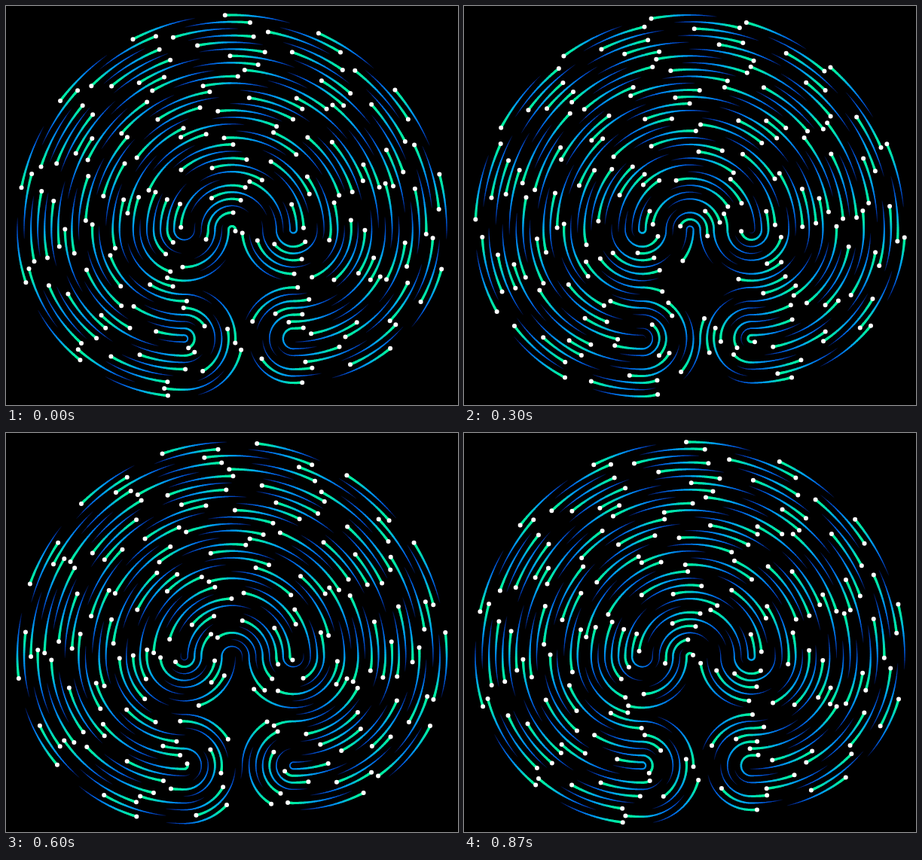
Animation of 600 by 530 pixels, one loop 900 ms. Source, as an HTML page with a canvas:

```html
<!DOCTYPE html>
<html lang="en">
<head>
<meta charset="utf-8">
<title>Labyrinth comets</title>
<style>
  html, body { margin: 0; width: 600px; height: 530px; overflow: hidden; background: #000; }
  canvas { display: block; }
</style>
</head>
<body>
<canvas id="stage" width="600" height="530"></canvas>
<script>
const ctx = document.getElementById('stage').getContext('2d');
const { PI, abs, cos, sin } = Math;
const UNIT = 285 / 31.5, CX = 300, CY = 297;
const COMETS = 200, SUB = 120, TAIL = 82;   // samples per comet gap, tail length in samples
const STEPS = 30, STEP_MS = 30;
const LEFT = -1, RIGHT = 1, DROP = 16;      // lower turning points sit DROP units below the upper ones
const offset = { [LEFT]: 7, [RIGHT]: 9 };   // distance of the turning points from the middle

// Arcs in units; side mirrors x, so angle 0 always points outward and PI / 2 down.
const arcs = [];
let total = 0;
function arc(side, c, y, r, from, to) {
  const len = r * abs(to - from);
  arcs.push({ side, c, y, r, from, to, len });
  total += len;
}

// Leads from the end of lane k on one side to the start of the next lane.
function turn(k, side) {
  const c = offset[side], r = k + 0.5 - c;
  if (side === LEFT && k === 31) {          // crossing at the entrance
    arc(LEFT, 7, 0, r, 0, PI / 2);
    arc(LEFT, 7, DROP, 8.5, PI / 2, PI);
    arc(RIGHT, 9, DROP, 7.5, PI, PI * 1.5);
    arc(RIGHT, 9, 0, 8.5, PI / 2, 0);
    return { k: 17, side: RIGHT };
  }
  if (side === RIGHT && k === 0) {          // crossing at the centre
    arc(LEFT, 7, 0, 7.5, PI, 0);
    return { k: 14, side: LEFT };
  }
  if (k < 2 * c) {
    arc(side, c, 0, abs(r), r > 0 ? 0 : PI, r > 0 ? PI : 0);
    return { k: 2 * c - 1 - k, side };
  }
  const d = r - DROP, a = d > 0 ? PI / 2 : -PI / 2;
  arc(side, c, 0, r, 0, PI / 2);
  arc(side, c, DROP, abs(d), a, a + (d > 0 ? PI : -PI));
  arc(side, c, 0, DROP - d, PI / 2, 0);
  return { k: 2 * (c + DROP) - 1 - k, side };
}

let lane = turn(0, RIGHT);
for (let i = 0; i < 32; i++) {
  arc(lane.side, 0, 0, lane.k + 0.5, 0, -PI);
  if (i < 31) lane = turn(lane.k, -lane.side);
}

// Evenly spaced samples along the closed curve.
const COUNT = COMETS * SUB;
const pts = [];
for (let i = 0, n = 0, start = 0; i < COUNT; i++) {
  const s = i / COUNT * total;
  while (n < arcs.length - 1 && s > start + arcs[n].len) start += arcs[n++].len;
  const { side, c, y, r, from, to, len } = arcs[n];
  const a = from + (to - from) * (s - start) / len;
  pts.push([CX + UNIT * side * (c + r * cos(a)), CY + UNIT * (y + r * sin(a))]);
}
const at = i => pts[(i + COUNT) % COUNT];

const stops = [
  [0, 0, 250, 150], [0.2, 0, 224, 178], [0.42, 0, 162, 238],
  [0.7, 0, 98, 225], [0.9, 4, 52, 165], [1, 2, 22, 80]
];
function color(q) {
  let n = 1;
  while (q > stops[n][0]) n++;
  const a = stops[n - 1], b = stops[n], f = (q - a[0]) / (b[0] - a[0]);
  return `rgb(${[1, 2, 3].map(j => Math.round(a[j] + (b[j] - a[j]) * f))})`;
}

function draw(step) {
  const shift = (step + 0.5) * SUB / STEPS;
  ctx.fillStyle = '#000';
  ctx.fillRect(0, 0, 600, 530);
  for (let j = TAIL; j > 0; j -= 2) {
    const q = j / TAIL;
    ctx.strokeStyle = color(q);
    ctx.lineWidth = 3.5 - 2.8 * q;
    ctx.beginPath();
    for (let i = 0; i < COMETS; i++) {
      const head = i * SUB + shift;
      ctx.moveTo(...at(head - j));
      ctx.lineTo(...at(head - j + 1));
      ctx.lineTo(...at(head - j + 2));
      ctx.lineTo(...at(head - j + 3));
    }
    ctx.stroke();
  }
  ctx.fillStyle = '#fff';
  ctx.beginPath();
  for (let i = 0; i < COMETS; i++) {
    const [x, y] = at(i * SUB + shift);
    ctx.moveTo(x + 3, y);
    ctx.arc(x, y, 3, 0, 2 * PI);
  }
  ctx.fill();
}

const t0 = performance.now();
let shown = 0;
function tick() {
  const step = Math.floor((performance.now() - t0) / STEP_MS) % STEPS;
  if (step !== shown) draw(shown = step);
  requestAnimationFrame(tick);
}
draw(0);
requestAnimationFrame(tick);
</script>
</body>
</html>
```
